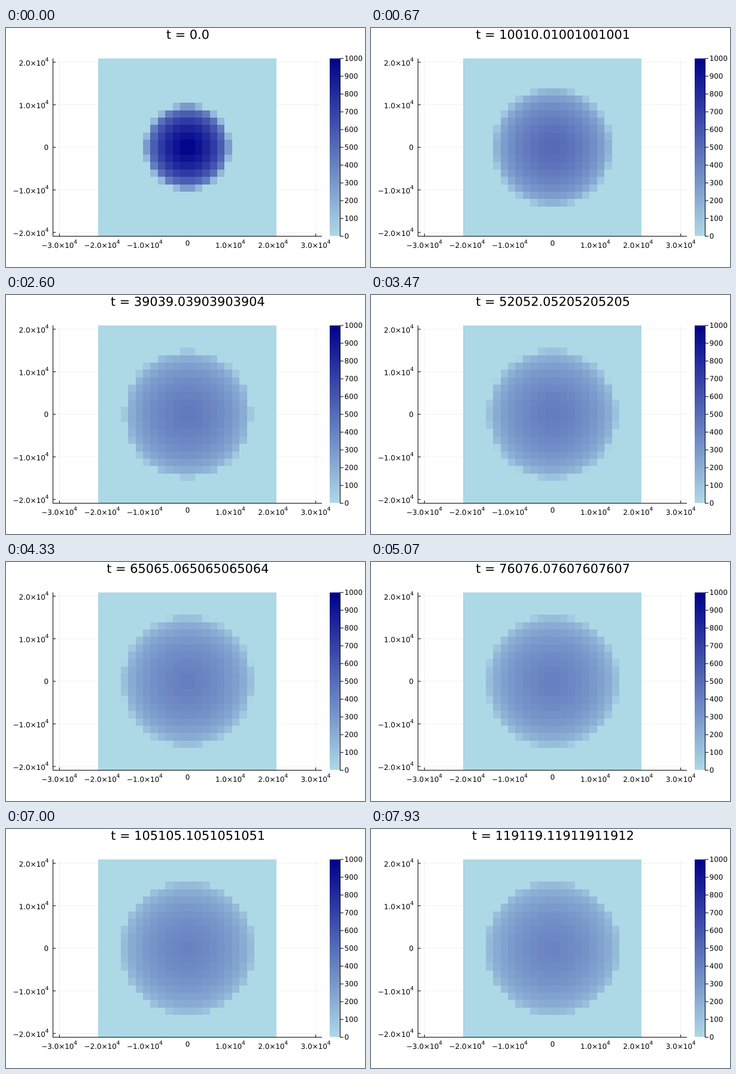
These frames come from a looping animation (600x400 px, 8000 ms). A matplotlib script:

```python
import numpy as np
import matplotlib.pyplot as plt
from matplotlib.animation import FuncAnimation
from matplotlib.colors import LinearSegmentedColormap
from matplotlib.patches import PathPatch
from matplotlib.path import Path
from matplotlib.textpath import TextPath

plt.rcParams.update({"font.family": "DejaVu Sans", "toolbar": "None"})

W, H, DPI = 600, 400, 100
LOOP_MS, TICK_MS, STEPS = 8000, 20, 120
FRAMES = LOOP_MS // TICK_MS

# Plot geometry in pixels
X0, X_UNIT = 303.5, 71.39           # x origin and length of 1e4
Y0, Y_UNIT = 199.7, 71.24
LEFT, RIGHT, TOP, BOTTOM = 78.5, 528, 51, 348.5
LABEL, POWER, TITLE = 11.95, 9.3, 20.85

# Spreading dome (similarity solution)
CELLS, PEAK, RADIUS, T_SCALE = 24, 1000.0, 1.0e4, 27.0
axis = np.linspace(-2e4, 2e4, CELLS)
dist = np.hypot(*np.meshgrid(axis, axis))


def dome(t):
    grow = (1 + t / T_SCALE) ** (1 / 18)
    body = 1 - (dist / (RADIUS * grow)) ** (4 / 3)
    return PEAK / grow**2 * np.clip(body, 0, None) ** (3 / 7)


def clock(step):
    return step * 1e6 / 999


fig = plt.figure(figsize=(W / DPI, H / DPI), dpi=DPI, facecolor="white")
ax = fig.add_axes([0, 0, 1, 1])
ax.axis("off")
cmap = LinearSegmentedColormap.from_list("ice", ["lightblue", "darkblue"])


def line(x1, y1, x2, y2, alpha=1.0, z=3):
    ax.plot([x1, x2], [y1, y2], color="black", alpha=alpha, lw=72 / DPI,
            solid_capstyle="butt", snap=False, zorder=z)


def glyphs(x, y, s, size, align="left"):
    """Outline of a text whose baseline is at y."""
    shape = TextPath((0, 0), s, size=size)
    box = shape.get_extents()
    shift = {"left": 0, "center": (box.x0 + box.x1) / 2, "right": box.x1}
    return Path(shape.vertices * [1, -1] + [x - shift[align], y], shape.codes)


def ink(path):
    return ax.add_patch(PathPatch(path, fc="black", lw=0, snap=False, zorder=4))


def cells(data, x1, x2, y1, y2):
    rows, cols = data.shape
    return ax.pcolormesh(np.linspace(x1, x2, cols + 1),
                         np.linspace(y1, y2, rows + 1), data, cmap=cmap,
                         vmin=0, vmax=PEAK, antialiased=False, zorder=2)


labels = []


def label(*args):
    labels.append(glyphs(*args))


def power_label(right, base, k):
    """Label k.0 x 10^4 with its right end at the given place."""
    sign = "\u2212" if k < 0 else ""
    label(right - 6.2, base, f"{sign}{abs(k)}.0\u00d710", LABEL, "right")
    label(right - 0.3, base - 7, "4", POWER, "right")


# Grid, ticks and labels; the field hides the ticks beneath it
for k in range(-3, 4):
    x = X0 + k * X_UNIT
    line(x, TOP, x, BOTTOM, 0.06, 1)
    line(x, BOTTOM, x, BOTTOM - 4.5, z=1)
    if k:
        power_label(x + (29.5 if k < 0 else 24.7), 368, k)
    else:
        label(x, 364.3, "0", LABEL, "center")

for k in range(-2, 3):
    y = Y0 - k * Y_UNIT
    line(LEFT, y, RIGHT, y, 0.06, 1)
    line(LEFT, y, LEFT + 4.5, y, z=1)
    if k:
        power_label(71.2, y + 5.8, k)
    else:
        label(70.3, y + 4.3, "0", LABEL, "right")

line(LEFT, TOP, LEFT, BOTTOM + 0.5)
line(LEFT - 0.5, BOTTOM, RIGHT, BOTTOM)

# Colour bar
cells(np.linspace(PEAK, 0, 256)[:, None], 541, 558, TOP, 348)
line(558.5, TOP, 558.5, BOTTOM)
for v in range(0, 1001, 100):
    y = BOTTOM - v / PEAK * (BOTTOM - TOP)
    line(558, y, 564, y)
    label(565.6, y + 4, str(v), LABEL)

ink(Path.make_compound_path(*labels))
field = cells(dome(0), 154.45, 452.4, 50.95, 348.4)
title = ink(glyphs(0, 0, "t", TITLE))
ax.set_xlim(0, W)
ax.set_ylim(H, 0)


def draw(i):
    # steps fall on whole hundredths of a second
    t = clock(int((i * TICK_MS + 15) * STEPS / LOOP_MS))
    field.set_array(dome(t))
    title.set_path(glyphs(303.5, 18.2, f"t = {t!r}", TITLE, "center"))
    return field, title


anim = FuncAnimation(fig, draw, frames=FRAMES, init_func=lambda: draw(0),
                     interval=TICK_MS, repeat=True, repeat_delay=0,
                     blit=False)
plt.show()
```
